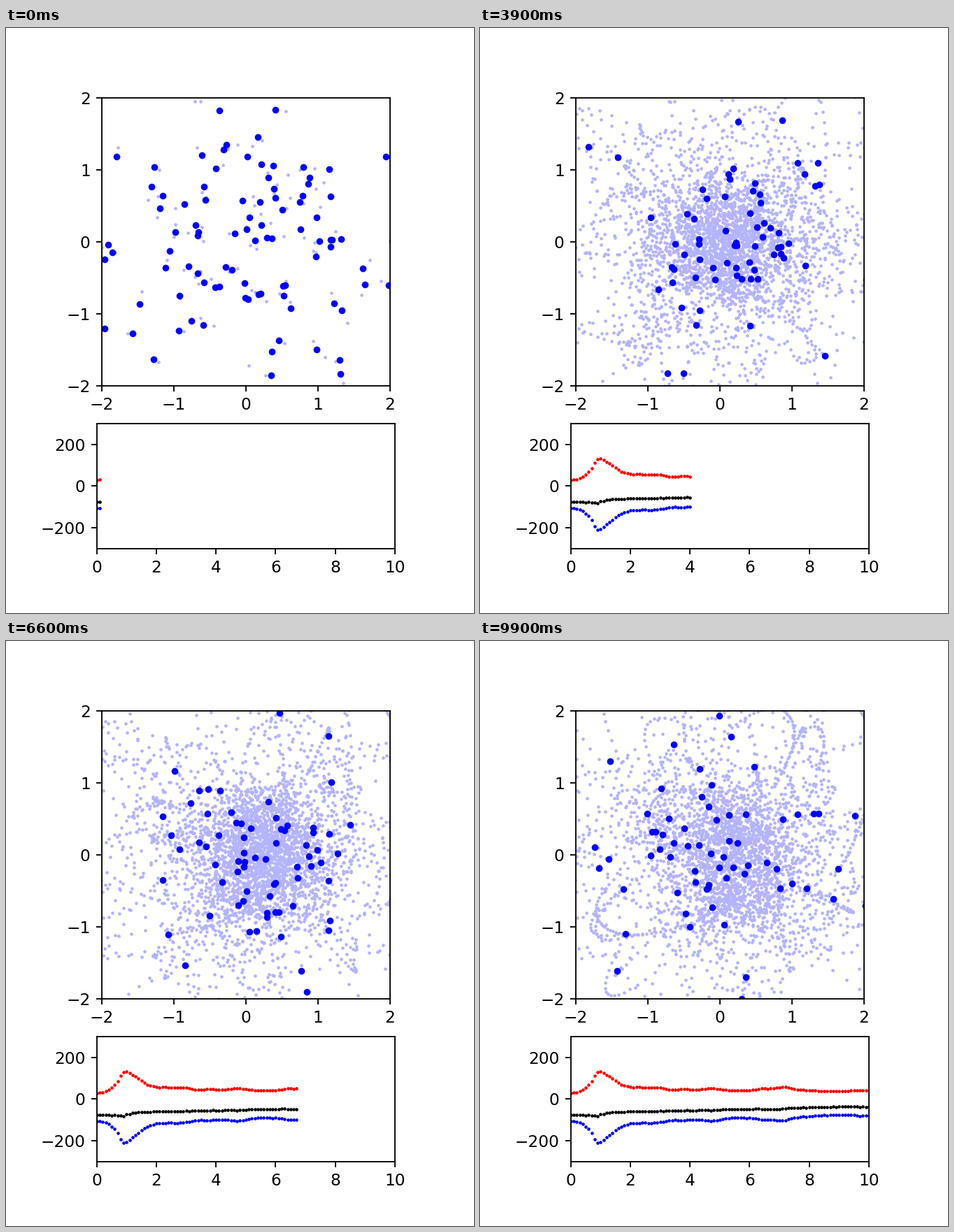
These frames come from a looping animation (669 px wide and 837 px high, 10000 ms). A matplotlib script:

```python
import numpy as np
import matplotlib.pyplot as plt
from matplotlib.animation import FuncAnimation

N = 100          # particles
STEPS = 100
DT = 0.1
T_END = STEPS * DT
SOFTENING = 0.1
G = 1.0
TRAIL = 50       # past positions kept on screen


def separations(pos):
    x, y, z = pos[:, 0:1], pos[:, 1:2], pos[:, 2:3]
    return x.T - x, y.T - y, z.T - z


def acceleration(pos, mass):
    dx, dy, dz = separations(pos)
    inv_r3 = (dx**2 + dy**2 + dz**2 + SOFTENING**2) ** (-1.5)
    ax = G * (dx * inv_r3) @ mass
    ay = G * (dy * inv_r3) @ mass
    az = G * (dz * inv_r3) @ mass
    return np.hstack((ax, ay, az))


def energy(pos, vel, mass):
    kinetic = 0.5 * np.sum(np.sum(mass * vel**2))
    dx, dy, dz = separations(pos)
    inv_r = np.sqrt(dx**2 + dy**2 + dz**2)
    inv_r[inv_r > 0] = 1.0 / inv_r[inv_r > 0]
    potential = G * np.sum(np.sum(np.triu(-(mass * mass.T) * inv_r, 1)))
    return kinetic, potential


def simulate():
    """Leapfrog (kick-drift-kick) run; returns positions and energies."""
    np.random.seed(17)
    mass = 20.0 * np.ones((N, 1)) / N
    pos = np.random.randn(N, 3)
    vel = np.random.randn(N, 3)
    vel -= np.mean(mass * vel, 0) / np.mean(mass)
    acc = acceleration(pos, mass)

    path = [pos.copy()]
    energies = [energy(pos, vel, mass)]
    for _ in range(STEPS):
        vel += acc * DT / 2.0
        pos += vel * DT
        acc = acceleration(pos, mass)
        vel += acc * DT / 2.0
        path.append(pos.copy())
        energies.append(energy(pos, vel, mass))
    return np.array(path), np.array(energies)


path, energies = simulate()
times = np.arange(STEPS + 1) * DT
kinetic, potential = energies.T

fig = plt.figure(figsize=(4, 5.0045), dpi=167.25, facecolor="white")
grid = fig.add_gridspec(3, 1, wspace=0.0, hspace=0.3)

ax_space = fig.add_subplot(grid[0:2, 0])
ax_space.set(xlim=(-2, 2), ylim=(-2, 2),
             xticks=range(-2, 3), yticks=range(-2, 3))
ax_space.set_aspect("equal", "box")

ax_energy = fig.add_subplot(grid[2, 0])
ax_energy.set(xlim=(0, T_END), ylim=(-300, 300),
              xticks=range(0, 11, 2), yticks=(-200, 0, 200))
ax_energy.set_aspect(0.007)

trail = ax_space.scatter([], [], s=1, color=[0.7, 0.7, 1])
stars = ax_space.scatter([], [], s=10, color="blue")
curves = [
    (ax_energy.scatter([], [], s=1, color=color), np.column_stack((times, values)))
    for color, values in (("red", kinetic), ("blue", potential),
                          ("black", kinetic + potential))
]


def update(i):
    trail.set_offsets(path[max(i - TRAIL, 0):i + 1, :, :2].reshape(-1, 2))
    stars.set_offsets(path[i + 1, :, :2])
    for dots, points in curves:
        dots.set_offsets(points[:i + 2])
    return [trail, stars] + [dots for dots, _ in curves]


anim = FuncAnimation(fig, update, frames=STEPS, interval=100,
                     repeat=True, repeat_delay=0, blit=False)
plt.show()
```
